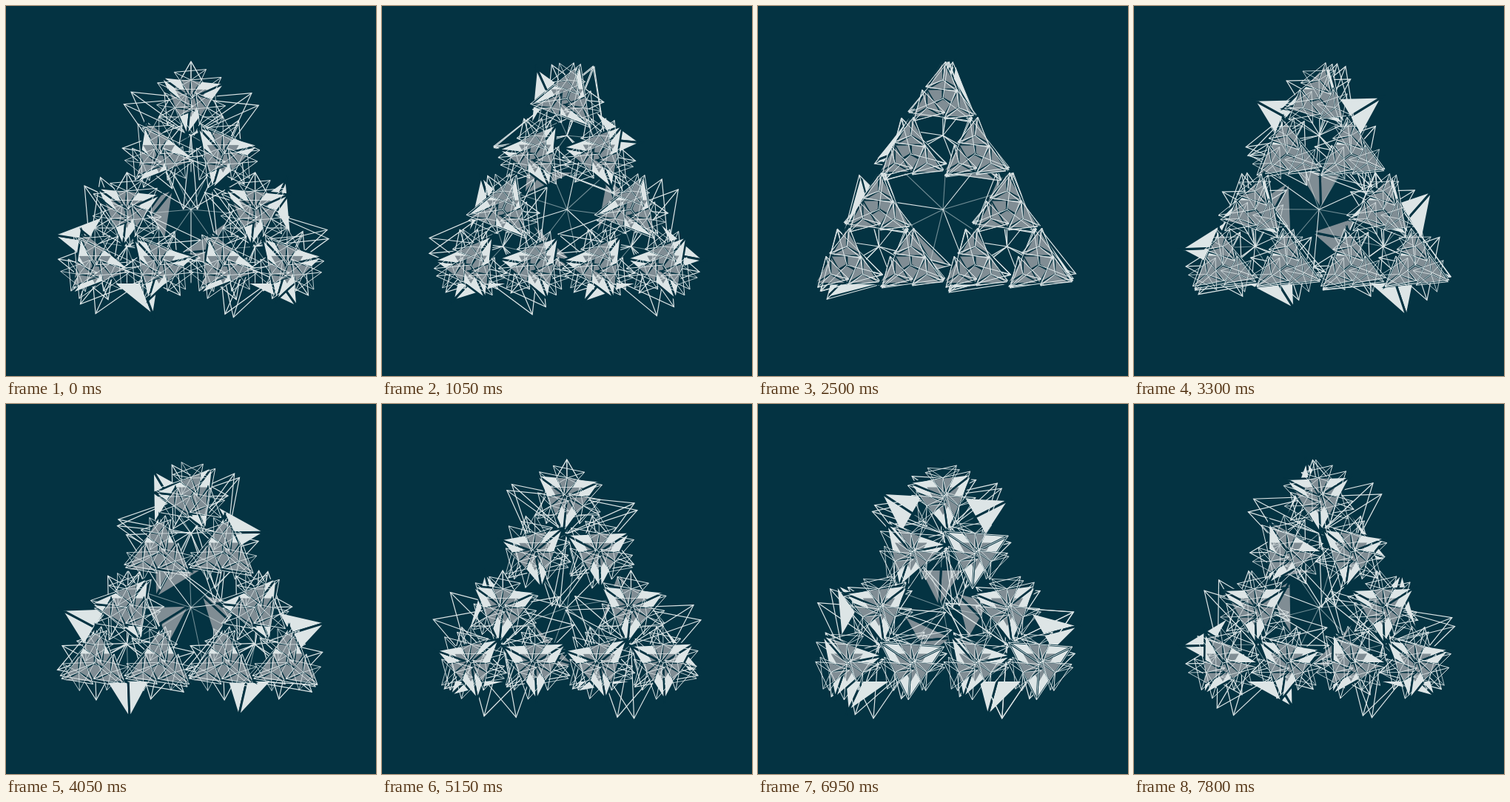
An HTML page with a canvas for the animation above (7.85 s loop, 500x500 px).

```html
<!DOCTYPE html>
<html lang="en">
<head>
<meta charset="utf-8">
<title>Spinning triangles</title>
<style>
html, body { margin: 0; width: 100%; height: 100%; overflow: hidden; background: #043342; }
canvas { display: block; width: 500px; height: 500px; }
</style>
</head>
<body>
<canvas id="stage" width="500" height="500"></canvas>
<script>
const ctx = document.getElementById('stage').getContext('2d');
const BG = '#043342', WHITE = '#dde5e6', GREY = '#808d94';
const STEP = 50, STEPS = 157, RAD = Math.PI / 180;
const SPIN = 4 * 360 / STEPS;

// Drift in degrees on top of the steady spin, for the top, left and right corner.
const KEYS = [0, 21, 50, 81, 103, 121];
const SLOW = [[30, 53, 61, 96, 45, 15], [69, 60, 37, 65, 31, 12], [55, 58, 46, 80, 35, 10]];
const MAIN = [[96, 98, 51, 43, 111, 153], [129, 114, 51, 8, 95, 165], [107, 117, 51, 10, 103, 163]];
const NEAR = [[85, 99, 59, 48, 117, 156], [115, 102, 36, 17, 120, 156], [114, 102, 43, 17, 116, 156]];

// Smooth periodic curve through the keys.
function drift(vals, f) {
  const n = KEYS.length;
  const time = i => KEYS[(i + n) % n] + STEPS * Math.floor(i / n);
  const val = i => vals[(i + n) % n];
  const slope = i => (val(i + 1) - val(i - 1)) / (time(i + 1) - time(i - 1));
  let i = n - 1;
  while (KEYS[i] > f) i--;
  const h = time(i + 1) - time(i), u = (f - time(i)) / h;
  const u2 = u * u, u3 = u2 * u;
  return (2 * u3 - 3 * u2 + 1) * val(i) + (u3 - 2 * u2 + u) * h * slope(i) +
    (3 * u2 - 2 * u3) * val(i + 1) + (u3 - u2) * h * slope(i + 1);
}

const angles = (set, f) => set.map(v => drift(v, f) + SPIN * f);

function corners(c, r, deg) {
  return [0, 120, 240].map(a => ({
    x: c.x + r * Math.cos((deg + a) * RAD),
    y: c.y + r * Math.sin((deg + a) * RAD)
  }));
}

function trace(pts) {
  ctx.beginPath();
  pts.forEach(p => ctx.lineTo(p.x, p.y));
  ctx.closePath();
}

// Child centres in the order top, left, right.
const split = (c, r) => {
  const p = corners(c, r / 2, -90);
  return [p[0], p[2], p[1]];
};

function solid(c, r, deg, color, gap) {
  const p = corners(c, r, deg);
  ctx.fillStyle = color;
  ctx.strokeStyle = BG;
  ctx.lineWidth = gap;
  p.forEach((a, i) => {
    trace([c, a, p[(i + 1) % 3]]);
    ctx.fill();
    ctx.stroke();
  });
}

function spokes(c, pts) {
  ctx.beginPath();
  pts.forEach(p => {
    ctx.moveTo(c.x, c.y);
    ctx.lineTo(p.x, p.y);
  });
  ctx.stroke();
}

function wire(c, r, deg, width = 1.2) {
  const p = corners(c, r, deg);
  ctx.strokeStyle = WHITE;
  ctx.lineWidth = width;
  trace(p);
  ctx.stroke();
  spokes(c, p);
}

function within(pts, paint) {
  ctx.save();
  trace(pts);
  ctx.clip();
  paint();
  ctx.restore();
}

// Spokes turning inside the open middle of a tile, one bright set and two dim ones.
function hub(c, r, turns) {
  within(corners(c, r, 90), () => {
    ctx.strokeStyle = WHITE;
    ctx.lineWidth = 1.1;
    turns.forEach((deg, i) => {
      ctx.globalAlpha = i ? 0.5 : 1;
      spokes(c, corners(c, r, deg));
    });
  });
}

const root = { x: 250, y: 275 };
const big = split(root, 200);

function draw(f) {
  const slow = angles(SLOW, f), main = angles(MAIN, f), near = angles(NEAR, f);
  const turn = 90 + SPIN * f;
  ctx.fillStyle = BG;
  ctx.fillRect(0, 0, 500, 500);

  // Large blades: white outside the whole figure, grey inside, hidden on their own tile.
  big.forEach((c, i) => solid(c, 100, slow[i], WHITE, 3));
  within(corners(root, 200, -90), () =>
    big.forEach((c, i) => solid(c, 100, slow[i], GREY, 3)));
  ctx.fillStyle = BG;
  big.forEach(c => {
    trace(corners(c, 100, -90));
    ctx.fill();
  });

  hub(root, 100, [turn, turn + 35, turn - 35]);
  big.forEach((c, i) => {
    hub(c, 50, [turn, slow[i]]);
    wire(c, 100, main[i]);
    wire(c, 100, near[i]);
  });

  big.forEach(b => split(b, 100).forEach((c, i) => {
    const small = split(c, 50);
    wire(c, 50, slow[i]);
    solid(c, 50, main[i], WHITE, 2.6);
    within(corners(c, 25, 90), () => solid(c, 50, main[i], GREY, 2.6));
    within(corners(c, 48, main[i]), () =>
      small.forEach((s, j) => solid(s, 25, main[j], GREY, 1.6)));
    wire(c, 50, near[i], 1);
    small.forEach((s, j) => {
      wire(s, 25, near[j], 1);
      wire(s, 25, slow[j], 0.8);
    });
  }));
}

function tick(now) {
  draw(Math.floor(now / STEP) % STEPS);
  requestAnimationFrame(tick);
}
draw(0);
requestAnimationFrame(tick);
</script>
</body>
</html>
```
